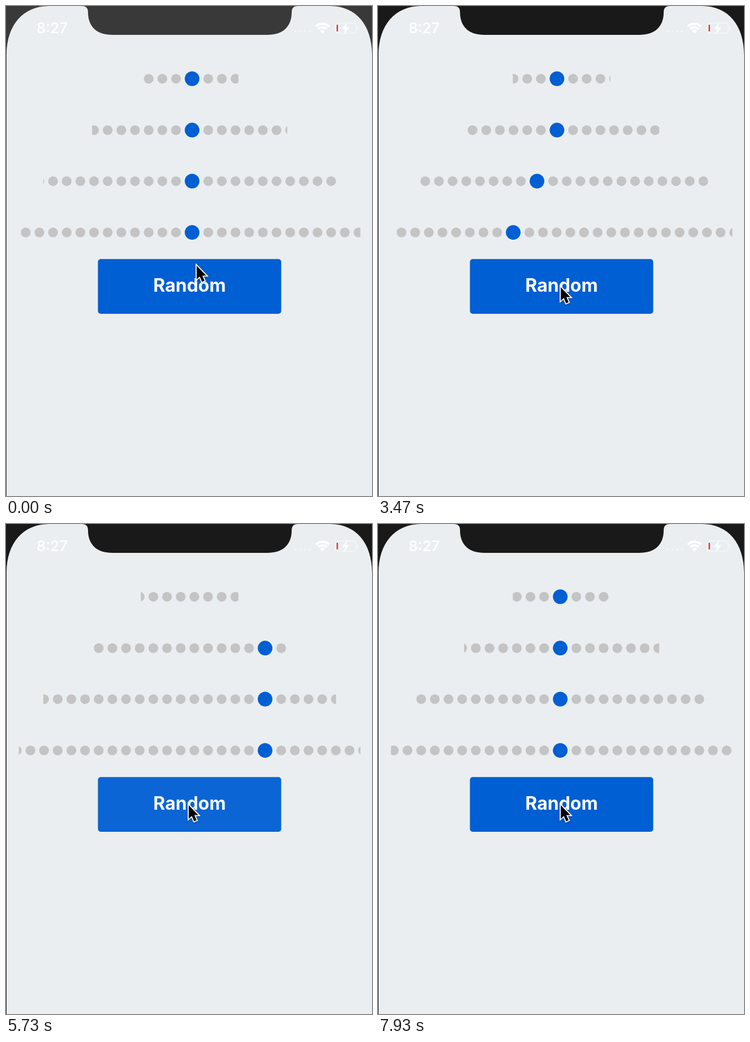
Recreate the animation shown at these times as an HTML page with a canvas. Size 647 px wide and 866 px high, loop 8 s.

```html
<!DOCTYPE html>
<html lang="en">
<head>
<meta charset="utf-8">
<title>Dot carousel</title>
<style>
  html, body { margin: 0; width: 100%; height: 100%; overflow: hidden; background: #191919; }
  canvas { display: block; width: 647px; height: 866px; }
</style>
</head>
<body>
<canvas id="stage" width="647" height="866"></canvas>
<script>
const ctx = document.getElementById('stage').getContext('2d');
const LOOP = 8000, COUNT = 50;
const PT = 1.725;               // pixels per layout point
const PITCH = 14 * PT, SMALL = 5 * PT, BIG = 7.5 * PT, FIRST = 17 * PT;
const GROW = 2 * (BIG - SMALL), CENTER = 324.65;
const SCROLL_MS = 430;
const BG = '#eaeef1', BLUE = '#005fd3', GRAY = '#c4c4c4';

const rows = [[128.5, 100], [219.3, 200], [309.5, 300], [400.2, 350]]
  .map(([y, pts]) => ({ y, width: pts * PT }));

// Each press: release time, chosen dot
const START = 16;
const presses = [
  [540, 10], [1000, 8], [1560, 8], [1910, 25], [2500, 28], [3084, 8], [3600, 3],
  [4120, 9], [4640, 22], [5520, 33], [6040, 11], [6590, 15], [7525, 24]
];

const clamp = p => Math.max(0, Math.min(1, p));
const ease = p => (1 - Math.cos(Math.PI * clamp(p))) / 2;

// The scroll goal is measured while the previous dot is still the large one.
const goal = (row, i, from) =>
  Math.max(0, FIRST + PITCH * i - row.width / 2 + (i > from ? GROW : 0));

function stateAt(row, t) {
  let active = START, from = goal(row, START, COUNT), to = from, began = -1e4;
  const scroll = now => from + (to - from) * ease((now - began) / SCROLL_MS);
  for (const [time, next] of presses) {
    if (time > t) break;
    if (next === active) continue;
    from = scroll(time);
    to = goal(row, next, active);
    began = time;
    active = next;
  }
  return { active, offset: scroll(t) };
}

function buttonAlpha(t) {
  let dim = 0;
  for (const [time] of presses) {
    const d = t - time;
    dim = Math.max(dim, d < 0 ? clamp(1 + d / 50) : 1 - ease(d / 250));
  }
  return 1 - 0.76 * dim;
}

function disc(x, y, r, color) {
  ctx.fillStyle = color;
  ctx.beginPath();
  ctx.arc(x, y, r, 0, 7);
  ctx.fill();
}

function box(x, y, w, h, r) {
  ctx.beginPath();
  ctx.roundRect(x, y, w, h, r);
}

function label(text, x, y, font, align) {
  ctx.font = font + ' Inter, "Open Sans", sans-serif';
  ctx.textAlign = align;
  ctx.fillStyle = '#fff';
  ctx.fillText(text, x, y);
}

function drawScreen(t) {
  ctx.fillStyle = t < 70 ? '#393939' : '#191919';
  ctx.fillRect(0, 0, 647, 866);
  ctx.fillStyle = BG;
  ctx.fill(new Path2D(`M1 866V86C1 34 30 0 76 0H134Q145 0 145 11
    C145 37 161 51 188 51H462C489 51 505 37 505 11Q505 0 516 0
    H573C619 0 647 34 647 86V866Z`));
}

function drawStatus() {
  label('8:27', 54, 48, '500 26px', 'left');
  for (let i = 0; i < 4; i++) disc(512 + i * 8.4, 45, 2, 'rgba(255,255,255,.4)');

  // Wi-Fi
  const side = 0.76, up = -Math.PI / 2;
  ctx.strokeStyle = ctx.fillStyle = '#fff';
  ctx.lineWidth = 4;
  for (const r of [17, 10.8]) {
    ctx.beginPath();
    ctx.arc(559.5, 48.5, r, up - side, up + side);
    ctx.stroke();
  }
  ctx.beginPath();
  ctx.moveTo(559.5, 48.5);
  ctx.arc(559.5, 48.5, 6.5, up - side, up + side);
  ctx.fill();

  // Battery
  ctx.strokeStyle = 'rgba(255,255,255,.55)';
  ctx.lineWidth = 1.5;
  box(582, 30, 37, 18, 5);
  ctx.stroke();
  ctx.fillStyle = 'rgba(255,255,255,.55)';
  ctx.fillRect(621, 36, 2, 6);
  ctx.fillStyle = '#e02b20';
  box(584.5, 33, 2.3, 12, 1);
  ctx.fill();
  ctx.fillStyle = '#fff';
  ctx.fill(new Path2D('M603 29L594 40.5H599.5L597.5 49L607 37.5H601Z'));
}

function drawRow(row, t) {
  const { active, offset } = stateAt(row, t);
  const left = CENTER - row.width / 2;
  ctx.save();
  ctx.beginPath();
  ctx.rect(left, row.y - 20, row.width, 40);
  ctx.clip();
  for (let i = 0; i < COUNT; i++) {
    const on = i === active;
    const shift = on ? GROW / 2 : i > active ? GROW : 0;
    const x = left + FIRST + PITCH * i + shift - offset;
    disc(x, row.y, on ? BIG : SMALL, on ? BLUE : GRAY);
  }
  ctx.restore();
}

function drawButton(t) {
  ctx.save();
  ctx.globalAlpha = buttonAlpha(t);
  ctx.fillStyle = BLUE;
  box(162.5, 447.3, 324, 96.7, 5);
  ctx.fill();
  label('Random', 324.5, 505, '700 32px', 'center');
  ctx.restore();
}

const arrow = new Path2D('M0 0V24L5.5 19L9.5 28.5L14 26.6L10 17.4H17Z');

function drawCursor(t) {
  const p = ease((t - 70) / 400);
  ctx.save();
  ctx.translate(337 - 14 * p, 459 + 38 * p);
  ctx.lineWidth = 3.6;
  ctx.strokeStyle = '#fff';
  ctx.shadowColor = 'rgba(0,0,0,.35)';
  ctx.shadowBlur = 3;
  ctx.shadowOffsetY = 1;
  ctx.stroke(arrow);
  ctx.shadowColor = 'transparent';
  ctx.fillStyle = '#000';
  ctx.fill(arrow);
  ctx.restore();
}

function draw(now) {
  const t = now % LOOP;
  drawScreen(t);
  drawStatus();
  rows.forEach(row => drawRow(row, t));
  drawButton(t);
  drawCursor(t);
}

let start;
function tick(now) {
  start ??= now;
  draw(now - start);
  requestAnimationFrame(tick);
}
draw(0);
requestAnimationFrame(tick);
</script>
</body>
</html>
```
